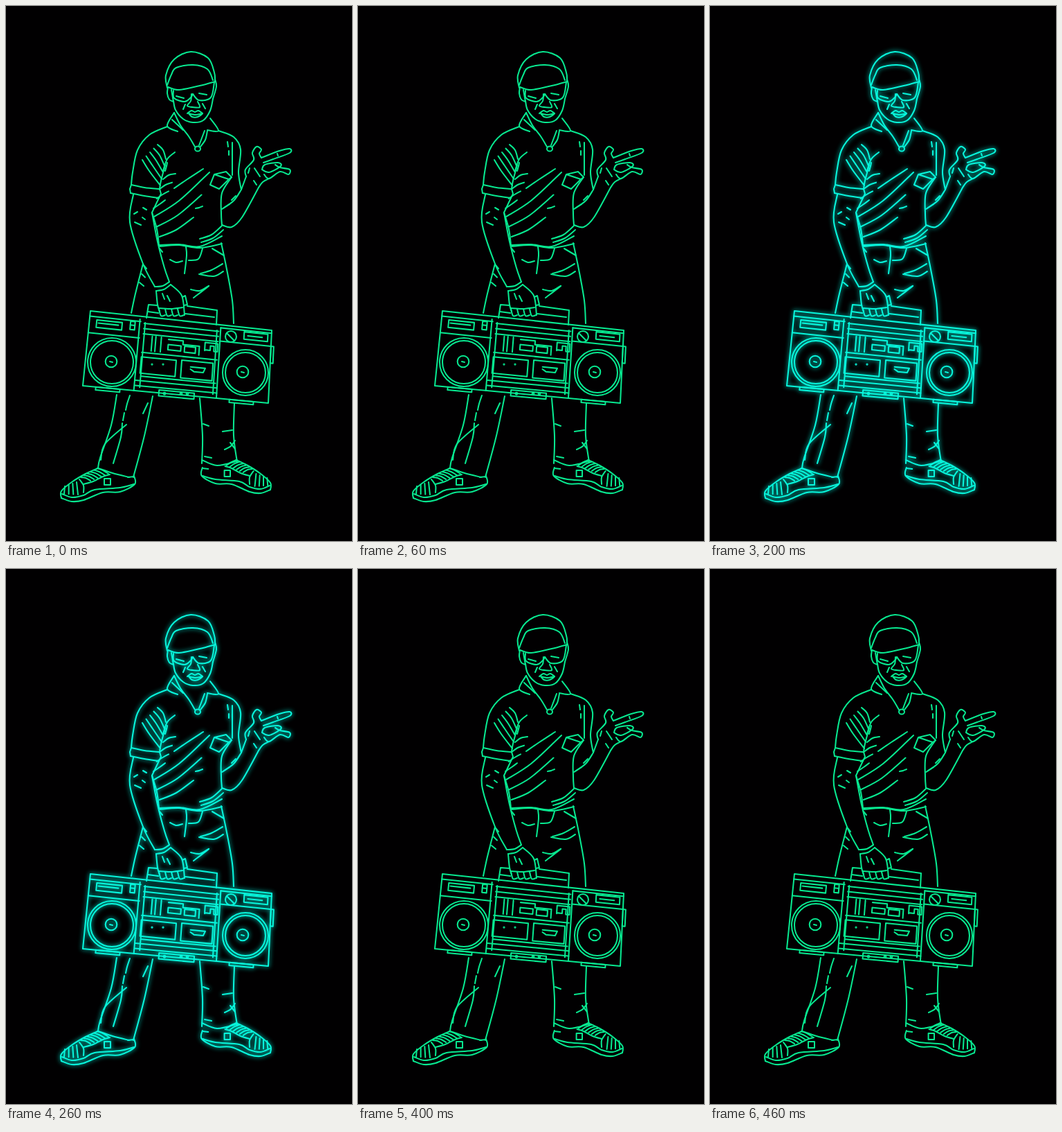
Animation, 500 px wide and 772 px high, one loop 500 ms. Source, as an HTML page:

```html
<!DOCTYPE html>
<html lang="en">
<head>
<meta charset="utf-8">
<title>Neon figure with a boombox</title>
<style>
html, body { margin: 0; width: 100%; height: 100%; overflow: hidden; background: #010001; }
svg { display: block; width: 100%; height: 100%; }
</style>
</head>
<body>
<svg viewBox="0 0 500 772" fill="none" stroke-linecap="round" stroke-linejoin="round">
  <defs>
    <filter id="blur" filterUnits="userSpaceOnUse" x="0" y="0" width="500" height="772">
      <feGaussianBlur id="soft" stdDeviation="4"/>
    </filter>
    <g id="figure"></g>
  </defs>
  <use id="glow" href="#figure" filter="url(#blur)" stroke-width="4"/>
  <use id="ink" href="#figure" stroke-width="2.05"/>
</svg>
<script>
const $ = id => document.getElementById(id);
const same = p => p;
const parse = text => text.trim().split(/\s+/).map(s => s.split(',').map(Number));

function add(tag, attrs) {
  const el = document.createElementNS('http://www.w3.org/2000/svg', tag);
  for (const key in attrs) el.setAttribute(key, attrs[key]);
  $('figure').append(el);
}

// Smooth path through every given point
function smooth(p) {
  const mix = (m, n, o) => m.map((v, k) => +(v + (o[k] - n[k]) / 6).toFixed(2));
  return p.slice(1).reduce((d, c, i) => {
    const b = p[i], a = p[i - 1] || b, e = p[i + 2] || c;
    return `${d}C${mix(b, a, c)} ${mix(c, e, b)} ${c}`;
  }, 'M' + p[0]);
}

function curves(text, map = same) {
  for (const stroke of text.split(';')) add('path', { d: smooth(parse(stroke).map(map)) });
}
const line = (text, map = same) => add('path', { d: 'M' + parse(text).map(map).join(' ') });
const oval = (cx, cy, rx, ry = rx) => add('ellipse', { cx, cy, rx, ry });

// n strokes blending from one shape into another
function hatch(from, to, n, map = same) {
  const a = parse(from), b = parse(to);
  for (let i = 0; i < n; i++) {
    const t = i / (n - 1);
    add('path', { d: smooth(a.map((p, j) => map(p.map((v, k) => v + (b[j][k] - v) * t)))) });
  }
}

function drawHead() {
  curves(`233,118 231,100 243,77 267,66 292,75 301,96 302,108;
    233,114 239,99 246,89 270,85 291,91 299,107;
    234,117 233,126 236,135 242,138; 239,121 242,138; 302,106 304,116 299,134;
    242,137 245,150 256,163 270,168 285,165 295,151 299,134`);
  // Glasses
  curves(`234,117 250,121 280,115 302,109; 242,122 243,133 258,138 267,132 270,127;
    270,127 279,136 296,132 301,110; 246,130 257,133; 279,126 290,128`);
  // Nose and mouth
  curves(`268,127 267,137 262,144 270,146 280,146 277,138; 262,155 268,151 273,153 278,151 284,155;
    264,155 274,157 284,155 277,160 269,160 264,155; 259,142 256,149; 284,141 288,148`);
}

function drawShirt() {
  // Collar and chain
  curves(`243,154 233,173 248,181; 243,154 252,172 264,188 273,203; 240,164 256,179;
    295,162 307,180 291,179; 291,180 288,193 281,203; 287,180 279,201`);
  oval(277, 206, 4, 3.6);
  // Sleeves and sides
  curves(`233,174 207,186 190,208 183,240 181,258; 222,264 224,252 230,230; 221,277 211,298;
    307,180 329,189 339,207 336,240 340,265; 327,197 327,244;
    326,247 312,270 311,300 312,316; 211,298 218,322 221,345`);
  hatch('181,258 200,262 222,264', '180,270 200,274 221,277', 2);
  line('181,258 179,264 180,270');
  line('222,264 224,271 221,277');
  line('320,196 321,203');
  line('322,209 322,215');
  line('301,243 295,258 308,264 322,250 301,243 318,239 326,247 322,250');
  // Folds
  hatch('219,200 227,208 231,221', '197,222 207,238 223,259', 5);
  hatch('244,211 233,221 227,238', '233,226 232,231 230,238', 2);
  hatch('227,250 235,244 245,242', '213,292 222,286 230,280', 4);
  hatch('214,304 250,281 294,240', '222,333 246,323 271,305', 3);
  hatch('243,263 262,250 285,235', '274,292 279,291 284,289', 2);
  hatch('221,345 250,344 280,347 312,332', '222,347 250,345 280,349 312,343', 2);
  hatch('280,336 297,330 312,317', '282,341 299,335 314,323', 2);
}

function drawArms() {
  curves(`184,272 179,312 198,372 215,405; 211,298 219,340 229,378 236,398;
    340,265 329,281 312,293; 340,265 347,246; 312,316 326,319 341,305 365,262`);
  hatch('185,300 190,297', '186,312 195,316', 2);
  hatch('198,291 203,294', '197,305 201,308', 2);
  hatch('315,291 323,286', '326,280 332,274', 2);
  // Raised hand
  curves(`347,246 346,236 358,222 356,212 362,203 369,207 366,213 369,219;
    369,219 395,209 410,206 410,212 386,221 372,226; 370,236 374,229 393,226 397,231 380,240 370,236;
    389,229 396,233 410,236 408,243 396,239 380,249 373,243; 365,262 371,254 380,249; 359,234 367,246`);
  hatch('352,234 350,241', '358,252 362,258', 2);
  line('392,213 393,216');
}

function drawLegs() {
  curves(`198,372 187,415 181,443; 311,342 319,380 327,425 329,458;
    260,347 261,360 258,386; 237,366 246,370 255,368; 264,367 278,365 284,350;
    298,350 315,360; 267,409 280,411 293,404 271,421; 222,350 226,355`);
  hatch('281,386 297,381 313,372', '279,387 300,390 314,383', 2);
  hatch('199,374 203,379', '193,399 199,404', 3);
  // Below the boombox
  curves(`160,561 152,605 136,652 133,667; 212,563 200,620 184,680; 179,562 175,574 173,583; 171,587 169,598;
    174,604 143,632 137,655; 168,602 166,622 155,660; 205,573 198,588; 133,667 154,674 178,680;
    280,566 284,620 283,660; 330,573 329,620 334,658; 283,655 305,663 333,657;
    313,614 327,612; 316,640 325,635 331,627; 324,630 331,639`);
  hatch('285,603 293,606', '287,650 297,652', 2);
}

function drawShoe(map) {
  curves(`133,667 115,675 95,687 80,700 80,710; 185,678 186,690 165,701 140,702 112,713 95,715 80,710;
    81,704 95,709 112,706 128,698 165,695 185,690; 176,680 185,679; 106,683 112,692 112,702;
    112,690 126,686 140,679 150,676`, map);
  hatch('85,693 84,704', '102,687 104,705', 4, map);
  hatch('108,680 115,681 122,685', '132,667 140,670 148,675', 6, map);
  line('142,682 151,682 151,691 142,691 142,682', map);
}

// Boombox face: u and v run from 0 to 100 across and down
const face = ([u, v]) => [122 + 2.62 * u - .11 * v + .0006 * u * v, 440 + .28 * u + 1.08 * v - .0003 * u * v];
const seg = (...p) => line(p.join(' '), face);
const box = (l, t, r, b) => line(`${l},${t} ${r},${t} ${r},${b} ${l},${b} ${l},${t}`, face);
const across = (l, r, ...rows) => rows.forEach(v => seg([l, v], [r, v]));
const down = (t, b, ...cols) => cols.forEach(u => seg([u, t], [u, b]));

function drawBoombox() {
  // Handle
  line('203,450 206,431 219,432');
  line('262,433 305,439 304,460');
  hatch('205,441 220,443', '259,444 301,449', 2);
  // Shell
  box(0, 0, 100, 100);
  down(4, 100, 27.5, 72);
  down(8, 95, 30.5, 70);
  across(0, 28, 7, 29);
  across(72, 100, 4, 22);
  across(30, 71, 9, 16, 23, 48);
  across(28, 72, 86, 93);
  box(7, 100, 20, 104);
  box(79, 100, 92, 104);
  box(100, 22, 101.5, 45);
  box(41, 96, 60, 104);
  // Displays and tuner
  box(4, 11, 18, 21);
  box(22.5, 8, 25, 19);
  across(5, 16, 15);
  across(22.5, 25, 13);
  box(85, 6, 98, 16);
  across(87, 95, 11);
  oval(325, 477, 8);
  line('320,473 330,483');
  down(25, 45, 35, 37, 40);
  box(44, 34, 51, 41);
  box(53, 34, 59, 42);
  seg([44, 27], [52, 27], [52, 32], [61, 32], [61, 44]);
  seg([64, 37], [64, 26], [71, 26], [71, 37], [69, 37], [69, 30], [67, 30], [67, 36], [64, 36]);
  // Tape decks
  box(30, 54, 49, 76);
  box(52, 53, 69, 77);
  across(31, 71, 80);
  seg([57, 61], [65, 61], [64, 67], [59, 67], [57, 64]);
  for (const x of [211, 227]) oval(x, 517, .6);
  for (const x of [229, 253, 262]) oval(x, 557 + x / 100, 1.4);
  // Speakers
  for (const [x, y, r, hub] of [[153, 514, 35, 152], [346, 529, 33, 342]]) {
    oval(x, y, r);
    oval(x, y, r - 4);
    oval(hub, y - 1, 8.3);
    line(`${hub - 2},${y - 1} ${hub + 2},${y}`);
  }
}

function drawGrip() {
  hatch('215,405 226,404 236,398', '217,411 228,409 238,402', 2);
  curves('217,411 219,431 222,441; 238,402 254,418 258,446; 221,436 238,437 255,435');
  for (let x = 221; x < 250; x += 9) curves(`${x},437 ${x + 3},447 ${x + 9},446`);
  hatch('226,415 229,423', '233,418 237,426', 2);
  line('255,420 259,418 262,431 257,432');
}

drawHead();
drawShirt();
drawArms();
drawLegs();
drawShoe(same);
drawShoe(([x, y]) => [382 - (x - 80) * .935, y - 12]);
drawBoombox();
drawGrip();

const dim = { ink: '#08e890', glow: '#00e080', power: 0, blur: 4 };
const looks = [
  dim,
  { ink: '#10f8a0', glow: '#00e888', power: .75, blur: 5.5 },
  { ink: '#08f6dc', glow: '#00dcc8', power: .6, blur: 3 },
  { ink: '#08f098', glow: '#00d878', power: .4, blur: 3.5 },
  dim
];
let shown;

function render(ms) {
  const look = looks[Math.floor(ms % 500 / 100)];
  if (look === shown) return;
  shown = look;
  $('ink').setAttribute('stroke', look.ink);
  $('glow').setAttribute('stroke', look.glow);
  $('glow').setAttribute('opacity', look.power);
  $('soft').setAttribute('stdDeviation', look.blur);
}

const start = performance.now();
function tick() {
  render(performance.now() - start);
  requestAnimationFrame(tick);
}
tick();
</script>
</body>
</html>
```
